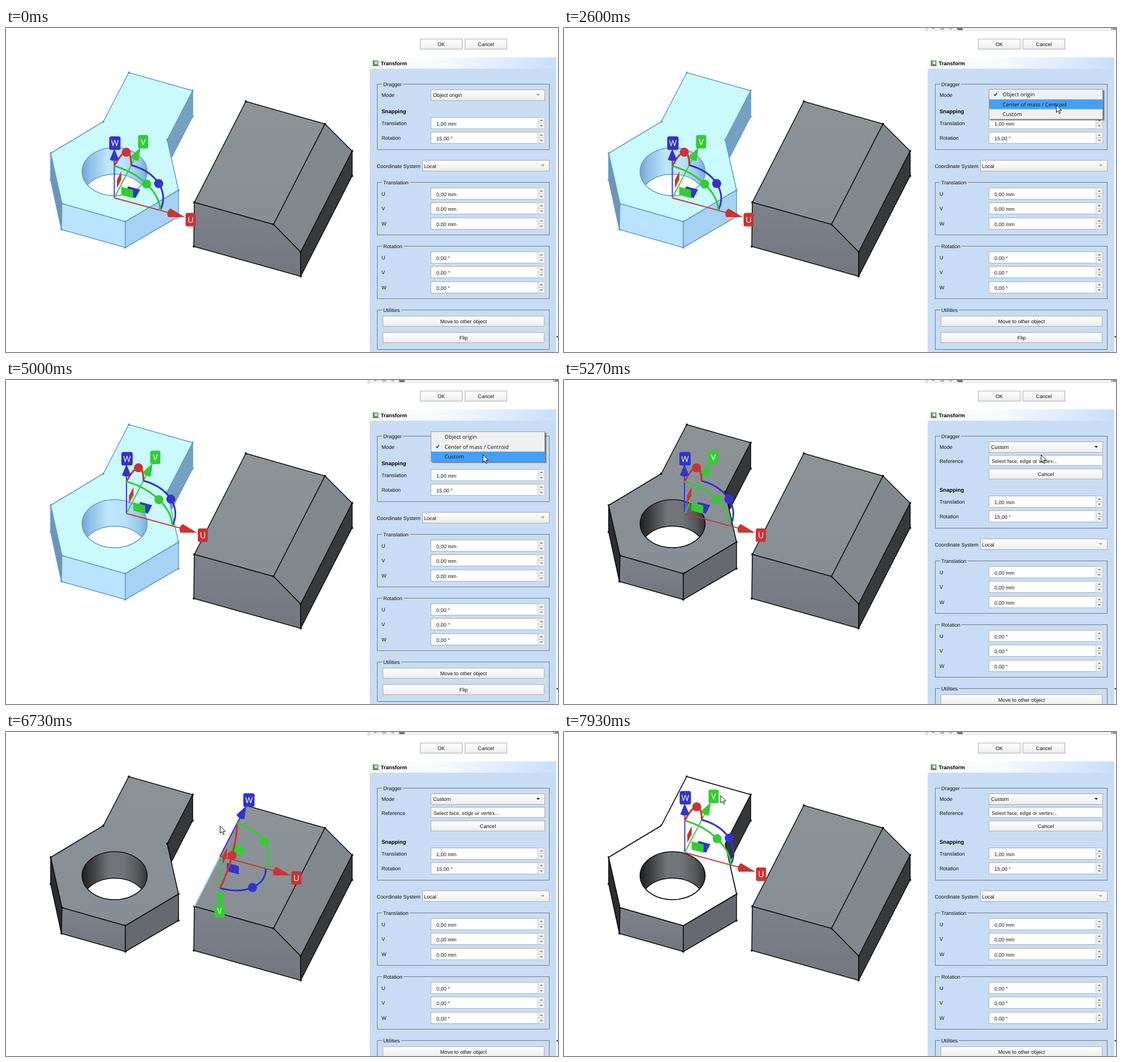
Recreate the animation shown at these times as an HTML page. Size 976 px wide and 574 px high, loop 8 s.

```html
<!DOCTYPE html>
<html lang="en">
<head>
<meta charset="utf-8">
<title>Transform panel</title>
<style>
html, body { margin: 0; height: 100%; overflow: hidden; background: #fff; }
svg { display: block; width: 100vw; height: 100vh; }
text { font: 9.1px "Liberation Sans", Arial, sans-serif; fill: #111; text-rendering: geometricPrecision; }
.mid { text-anchor: middle; }
.bold { font-weight: bold; font-size: 9.5px; fill: #000; }
.item { font: 9.5px "Open Sans", "Noto Sans", sans-serif; }
.legend { stroke: #c8ddf5; stroke-width: 5px; paint-order: stroke; }
.tag { font: 14.5px "Open Sans", "Noto Sans", sans-serif; fill: #fff; text-anchor: middle; }
.box { shape-rendering: crispEdges; }
.lower { animation: shift 8s step-end infinite; }
@keyframes shift {
  0% { transform: translateY(0); }
  65.8%, 100% { transform: translateY(47px); }
}
</style>
</head>
<body>
<svg id="stage" viewBox="0 0 976 574" preserveAspectRatio="none" xmlns="http://www.w3.org/2000/svg"></svg>
<script>
const LOOP = 8000;
const pct = t => (t / LOOP * 100).toFixed(4) + '%';
let css = '';

// Visible only during the given [from, to] spans in ms.
function show(name, ...spans) {
  let stops = '0%{opacity:0}';
  for (const [from, to] of spans) {
    stops += `${pct(from)}{opacity:1}`;
    if (to < LOOP) stops += `${pct(to)}{opacity:0}`;
  }
  css += `@keyframes ${name}{${stops}}.${name}{animation:${name} 8s step-end infinite}`;
}
const group = (name, body) => `<g class="${name}">${body}</g>`;

// ---- Solids ----
const poly = (pts, fill, line, w = 1.6) =>
  `<polygon points="${pts}" fill="${fill}" stroke="${line}" stroke-width="${w}" stroke-linejoin="round"/>`;
const edge = pts => `<polyline points="${pts}" fill="none" stroke="#a6eaf3" stroke-width="2"/>`;
const dots = (pts, fill) => pts.split(' ').map(p => {
  const [x, y] = p.split(',');
  return `<circle cx="${x}" cy="${y}" r="1.9" fill="${fill}"/>`;
}).join('');
const gradient = (id, stops, dir = '') =>
  `<linearGradient id="${id}" ${dir}>${stops.map(([o, c]) => `<stop offset="${o}" stop-color="${c}"/>`).join('')}</linearGradient>`;
const DOWN = 'x2="0" y2="1"';

const BLOCK_TOP = '424,130 564,170 473,348 333,309';
const PLATE = '217,79 330,111 285,198 305,287 211,343 99,311 79,222 172,166';
const HOLE = 'M134.5 254.5a57.5 42.5 0 1 1 115 0a57.5 42.5 0 1 1 -115 0z';

const block = () =>
  poly(BLOCK_TOP, 'url(#top)', '#111') +
  poly('564,170 612,218 521,397 473,348', '#81888e', '#111') +
  poly('333,309 473,348 521,397 521,440 332,387', 'url(#front)', '#111') +
  poly('612,218 612,262 521,440 521,397', '#38393b', '#111') +
  dots(BLOCK_TOP + ' 612,218 612,262 521,440 521,397 332,387', '#111');

const plateTop = (fill, line) =>
  `<path d="M${PLATE}z${HOLE}" fill="${fill}" fill-rule="evenodd" stroke="${line}" stroke-width="1.6" stroke-linejoin="round"/>`;

const part = c =>
  poly('330,111 330,157 293,229 285,198', c.back, c.line) +
  poly('79,222 99,311 98,357 79,269', c.left, c.line) +
  poly('99,311 211,343 211,389 98,357', c.front, c.line) +
  poly('211,343 305,287 305,334 211,389', c.right, c.line) +
  `<path d="${HOLE}" fill="url(#${c.wall})"/>
   <g clip-path="url(#hole)"><ellipse cx="192" cy="301.5" rx="57.5" ry="42.5" fill="#fff" stroke="${c.line}" stroke-width="1.6"/></g>` +
  plateTop(c.top, c.line) +
  dots(PLATE + ' 330,157 79,269 98,357 211,389 305,334', c.line);

const picked = { top: '#caf9fe', front: '#bae4fd', right: '#a8d2f3', left: '#6d95b2', back: '#769fc3', line: '#659ccb', wall: 'blueWall' };
const plain = { top: 'url(#top)', front: 'url(#front)', right: '#666a70', left: '#2d2e30', back: '#36373a', line: '#111', wall: 'greyWall' };

// ---- Dragger: screen directions with the place of the axis label ----
const DIR = {
  a: { d: [81, 22], tag: [135, 38.5] },
  b: { d: [30, -58], tag: [51, -99.5] },
  c: { d: [0, -56.5], tag: [1, -97] },
  n: { d: [0, 56.5], tag: [-1, 97] }
};
const COLORS = ['#cc3333', '#33cc33', '#3333cc'];
const mix = (p, s, q, t) => [p[0] * s + q[0] * t, p[1] * s + q[1] * t];

// axes names the directions of U, V and W.
function dragger(x, y, axes) {
  const dirs = [...axes].map(k => DIR[k]);
  let lines = '', arcs = '', planes = '', heads = '', tags = '';
  for (const i of [2, 0, 1]) {
    const c = COLORS[i], { d, tag } = dirs[i];
    const p = dirs[(i + 1) % 3].d, q = dirs[(i + 2) % 3].d;
    const ball = mix(p, .707, q, .707);
    const len = Math.hypot(...d), side = [-d[1] / len, d[0] / len];
    lines += `<path d="M0 0L${mix(d, 1.3, d, 0)}" stroke="${c}" stroke-width="1.9"/>`;
    arcs += `<path d="M${p}C${mix(p, 1, q, .552)} ${mix(p, .552, q, 1)} ${q}" fill="none" stroke="${c}" stroke-width="3.2"/>
      <circle cx="${ball[0]}" cy="${ball[1]}" r="8" fill="${c}"/>`;
    planes += `<polygon points="${mix(p, .15, q, .15)} ${mix(p, .41, q, .15)} ${mix(p, .41, q, .41)} ${mix(p, .15, q, .41)}" fill="${c}"/>`;
    heads += `<path d="M${mix(d, 1.54, d, 0)}L${mix(d, 1.2, side, 8)}Q${mix(d, 1.12, d, 0)} ${mix(d, 1.2, side, -8)}z" fill="${c}"/>`;
    tags += `<rect x="${tag[0] - (i == 2 ? 10 : 9)}" y="${tag[1] - 12}" width="${i == 2 ? 20 : 18}" height="24" rx="3.5" fill="${c}"/>
      <text class="tag" x="${tag[0]}" y="${tag[1] + 5.3}">${'UVW'[i]}</text>`;
  }
  return `<g transform="translate(${x} ${y})">${lines + planes + arcs + heads + tags}</g>`;
}

// ---- Panel widgets ----
const rect = (x, y, w, h, fill, line = '#adadad') =>
  `<rect class="box" x="${x + .5}" y="${y + .5}" width="${w}" height="${h}" fill="${fill}" stroke="${line}"/>`;
const text = (x, y, s, cls = '') => `<text x="${x}" y="${y}" class="${cls}">${s}</text>`;
const arrow = (x, y, up, fill) => {
  const k = up ? -1 : 1;
  return `<path d="M${x - 3} ${y - k * 1.5}h6l-3 ${3 * k}z" fill="${fill}"/>`;
};
const button = (x, y, w, h, s) =>
  rect(x, y, w, h, 'url(#face)') + text(x + w / 2 + .5, y + h / 2 + 3.7, s, 'mid');
const combo = (x, y, w) => rect(x, y, w, 19, 'url(#face)') + arrow(x + w - 11, y + 9.5, false, '#8d8d8d');
const spin = (y, label, value) =>
  text(664, y + 13.5, label) + rect(751, y, 201, 20, '#fff', '#abb0b6') +
  rect(940, y, 12, 10, '#f2f2f2', '#c3c6ca') + rect(940, y + 10, 12, 10, '#f2f2f2', '#c3c6ca') +
  arrow(946.5, y + 5.5, true, '#8a8a8a') + arrow(946.5, y + 15.5, false, '#8a8a8a') +
  text(761, y + 14.5, value);
const frame = (y, h, title) => rect(656, y, 304, h, 'none', '#73797f') + text(667, y + 3.5, title, 'legend');
const triple = (y, title, unit) => frame(y, 93, title) +
  [...'UVW'].map((axis, i) => spin(Math.round(y + 10 + i * 26.3), axis, '0,00 ' + unit)).join('');

const lower =
  text(664, 151, 'Snapping', 'bold') +
  spin(158, 'Translation', '1,00 mm') + spin(184, 'Rotation', '15,00 °') +
  text(655.5, 248, 'Coordinate System') + combo(736, 234, 224) + text(739, 248, 'Local') +
  triple(273, 'Translation', 'mm') + triple(386, 'Rotation', '°') +
  frame(499, 70, 'Utilities') +
  button(666, 510, 285, 18, 'Move to other object') + button(666, 539, 285, 18, 'Flip');

const strip =
  `<rect x="639" width="337" height="6" fill="#f0f0f0"/>
   <path d="M639 1.5h4M639 4.5h4" stroke="#888" stroke-width="1.2" stroke-dasharray="1.3 1.3"/>
   <path d="M651 2l2-2 2 2M666 0v2h5v-2M681 0q3 4 6 0" fill="none" stroke="#666"/>
   <rect x="695" y="-3" width="10" height="7" rx="2" fill="#777"/>` + text(966, 2.5, 'Task');

const icon =
  `<rect x="651.5" y="58.5" width="6" height="6" fill="#fff" stroke="#38963d" stroke-width="1.6"/>
   <path d="M649.5 67V57" stroke="#237a2b" stroke-width="1.6"/>
   <path d="M649 66.5h10" stroke="#a02525" stroke-width="1.6"/>`;

const panel =
  button(732, 19, 74, 18, 'OK') + button(811, 19, 74, 18, 'Cancel') +
  `<rect x="643" y="52" width="330" height="522" fill="#c8ddf5"/>
   <rect x="643" y="52" width="330" height="20" fill="url(#head)"/>` +
  icon + text(662.5, 66, 'Transform', 'bold') +
  group('lower', lower) +
  group('short', frame(99, 116, 'Dragger')) +
  group('long', frame(99, 163, 'Dragger') + text(664, 146.5, 'Reference') +
    rect(751, 133, 201, 18, '#fff', '#abb0b6') + text(756, 146.5, 'Select face, edge or vertex...') +
    button(751, 157, 201, 18, 'Cancel')) +
  text(664, 122, 'Mode') + combo(751, 109, 201) + group('active', arrow(941, 118.5, false, '#111')) +
  group('origin', text(755, 122, 'Object origin')) +
  group('centroid', text(755, 122, 'Center of mass / Centroid')) +
  group('custom', text(755, 122, 'Custom')) +
  '<path d="M973 545l3 1.5v2h-2z" fill="#8e1b1b"/>';

function popup(y, checked, marks) {
  const items = ['Object origin', 'Center of mass / Centroid', 'Custom'];
  return `<rect x="754" y="${y + 3}" width="202" height="53.5" fill="#000" opacity=".22"/>
    <rect x="753" y="${y + 2}" width="201.5" height="53" fill="#000" opacity=".4"/>` +
    rect(751, y, 201, 53, '#f0f0f0', '#9b9b9b') +
    marks.map(([name, row]) =>
      group(name, `<rect x="752" y="${y + 1 + row * 17.4}" width="200" height="17.4" fill="#45a0fb"/>`)).join('') +
    items.map((s, i) => text(775.5, y + 13.2 + i * 17.4, s, 'item')).join('') +
    `<path d="M760.5 ${y + 9.5 + checked * 17.4}l1.8 2.3 3.2-5" fill="none" stroke="#111" stroke-width="1.3"/>`;
}

// ---- Timing ----
show('strip', [1070, LOOP]);
show('short', [0, 5264]);
show('long', [5264, LOOP]);
show('origin', [0, 2800]);
show('centroid', [2800, 5200]);
show('custom', [5200, LOOP]);
show('active', [1467, 2800], [3600, LOOP]);
show('menuA', [1600, 2800]);
show('menuB', [4265, 5200]);
show('rowA0', [1600, 2460]);
show('rowA1', [2460, 2800]);
show('rowB1', [4265, 4795]);
show('rowB2', [4795, 5200]);
show('picked', [0, 5264]);
show('plain', [5264, LOOP]);

const poses = [
  [0, 2865, dragger(191.5, 301, 'abc')],
  [2865, 6395, dragger(213, 236.5, 'abc')],
  [6395, 6530, edge('424,130 564,170') + dragger(494, 151, 'nba')],
  [6530, 6660, poly(BLOCK_TOP, '#fff', '#111') + dragger(449, 239.5, 'abc')],
  [6660, 7060, edge('424,130 333,309') + dragger(378.5, 220, 'anb')],
  [7060, 7130, edge('330,111 330,157') + dragger(330, 134, 'abc')],
  [7130, 7530, edge('330,111 285,198') + dragger(307, 154.5, 'anb')],
  [7530, LOOP, plateTop('#fff', '#111') + dragger(213.5, 213.5, 'abc')]
];
poses.forEach(([from, to], i) => show('pose' + i, [from, to]));

// Pointer stops: time, x, y, jumps on the way to the next stop.
const stops = [
  [0, 962, 24, 1], [1065, 962, 24, 7], [1530, 868, 114, 1],
  [2263, 868, 114, 5], [2597, 870, 136, 1], [3463, 870, 136, 7], [3927, 860, 116, 1],
  [4463, 860, 116, 8], [4997, 843, 132, 1], [5267, 843, 132, 11], [5997, 600, 128, 7],
  [6462, 455, 164, 4], [6727, 378, 166, 2], [6865, 362, 160, 6], [7267, 309, 148, 1],
  [7400, 309, 148, 8], [7927, 276.5, 112, 1], [LOOP, 276.5, 112, 1]
];
css += '@keyframes move{' + stops.map(([t, x, y, n]) =>
  `${pct(t)}{transform:translate(${x}px,${y}px);animation-timing-function:steps(${n})}`).join('') +
  '}.pointer{animation:move 8s infinite}';

const defs = '<defs>' +
  gradient('top', [[0, '#8c9397'], [1, '#888f94']], DOWN) +
  gradient('front', [[0, '#7e838b'], [1, '#73767f']], DOWN) +
  gradient('face', [[0, '#ffffff'], [1, '#ececec']], DOWN) +
  gradient('head', [[0, '#ffffff'], [.4, '#f6faff'], [1, '#c8dff9']]) +
  gradient('blueWall', [[0, '#6fa4cd'], [.12, '#8fbfe4'], [.4, '#bfe6fd'], [.65, '#bce2fb'], [.88, '#9ac8ec'], [1, '#7aacd6']]) +
  gradient('greyWall', [[0, '#1f1f20'], [.14, '#3a3b3d'], [.42, '#727579'], [.65, '#707377'], [.88, '#515356'], [1, '#333436']]) +
  `<clipPath id="hole"><path d="${HOLE}"/></clipPath></defs>`;

document.getElementById('stage').innerHTML = defs +
  group('picked', part(picked)) + group('plain', part(plain)) + block() +
  poses.map((p, i) => group('pose' + i, p[2])).join('') +
  panel + group('strip', strip) +
  group('menuA', popup(108, 0, [['rowA0', 0], ['rowA1', 1]])) +
  group('menuB', popup(91, 1, [['rowB1', 1], ['rowB2', 2]])) +
  group('strip', group('pointer',
    '<path d="M.5 .5v13.2l3-2.8 2.1 4.9 2.1-.9-2.1-4.8h4.2z" fill="#fff" stroke="#111" stroke-linejoin="round"/>'));

const style = document.createElement('style');
style.textContent = css;
document.head.append(style);
</script>
</body>
</html>
```
